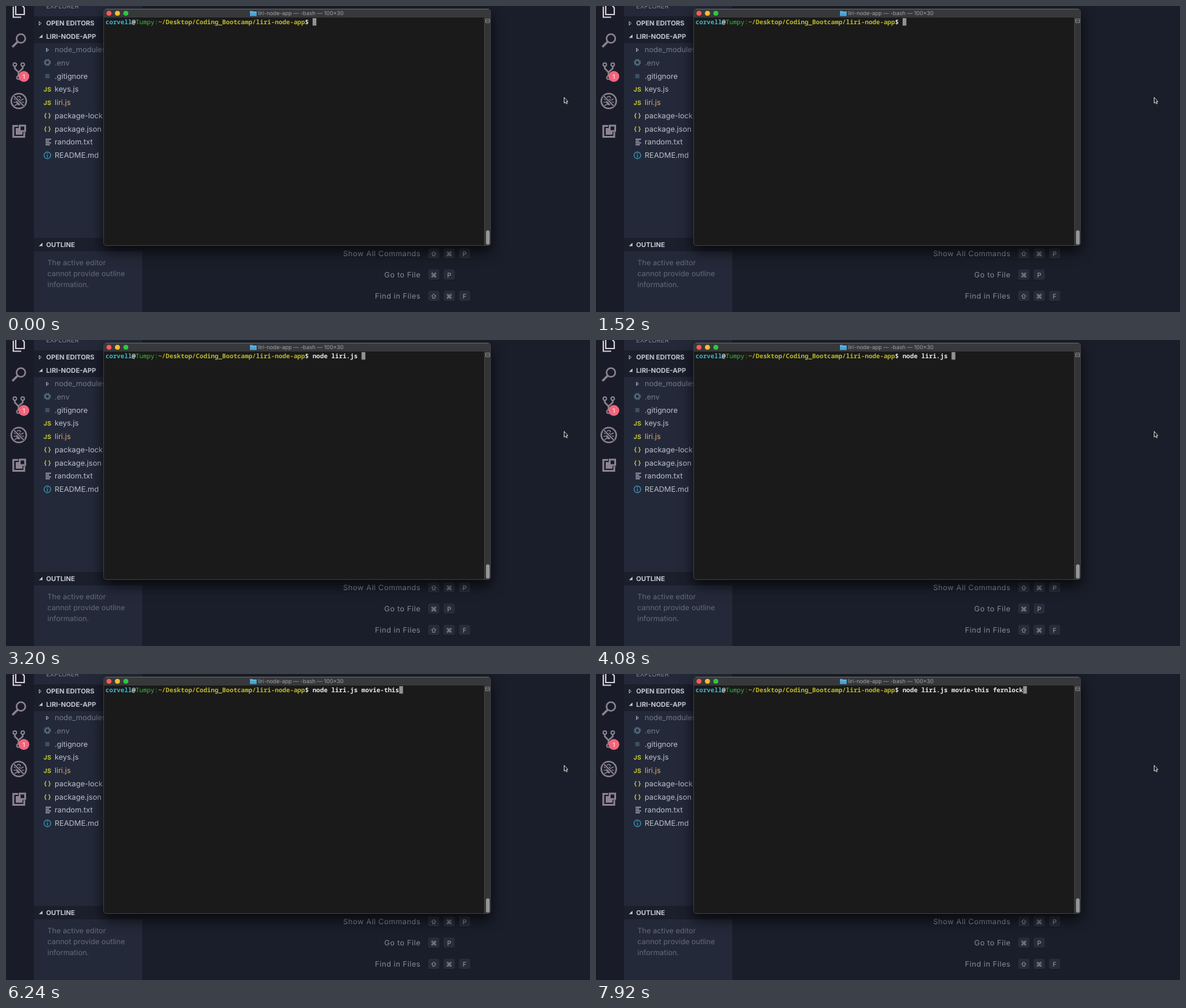
Animation, 960 px wide and 504 px high, one loop 8000 ms. Source, as an HTML page:

```html
<!DOCTYPE html>
<html lang="en">
<head>
<meta charset="utf-8">
<title>Terminal session</title>
<style>
  html, body { margin: 0; height: 100%; overflow: hidden; background: #1a1e2a; }
  svg { display: block; width: 960px; height: 504px; }
  text { font: 12.2px Inter, "Open Sans", sans-serif; text-rendering: geometricPrecision; white-space: pre; }
  .head { font-size: 10.8px; font-weight: 700; fill: #c3c7d1; }
  .note { font-size: 12.1px; fill: #656a7b; }
  .hint { letter-spacing: .5px; text-anchor: end; fill: #878b97; }
  .key { font: 10.5px Inter, "DejaVu Sans", sans-serif; text-anchor: middle; fill: #a0a4b0; }
  .mark { font-size: 10px; font-weight: 700; text-anchor: middle; fill: #c3c435; }
  .term { font: 700 10.32px "Noto Sans Mono", "DejaVu Sans Mono", monospace; fill: #e9e9e9; }
  .icon { fill: none; stroke: #8c8290; stroke-width: 2.6; }
</style>
</head>
<body>
<svg viewBox="0 0 960 504">
  <rect width="960" height="504" fill="#1a1e2a"/>
  <rect width="46" height="504" fill="#191c28"/>
  <rect x="46" width="178" height="504" fill="#242939"/>
  <path d="M46 17h178v44H46zM46 382h178v22H46z" fill="#1b1f2c"/>

  <!-- activity bar -->
  <g class="icon">
    <path d="M16 2V-3H25L30 3V14H16zM12 1V18.500H25" stroke="#d5ccd7" stroke-width="2.200"/>
    <circle cx="24.500" cy="53.500" r="7.200"/>
    <path d="M19 59L10.500 67.500" stroke-width="3.600"/>
    <circle cx="14.500" cy="96.500" r="2.800" stroke-width="2"/>
    <circle cx="27.500" cy="96.500" r="2.800" stroke-width="2"/>
    <circle cx="20.500" cy="118" r="2.800" stroke-width="2"/>
    <path d="M14.500 99V103L20.500 109V115M27.500 99V103L20.500 109"/>
    <circle cx="21" cy="156.500" r="12.300"/>
    <ellipse cx="21" cy="158" rx="4" ry="5.500" fill="#8c8290" stroke="none"/>
    <path d="M18 152a3 3 0 0 1 6 0M13 153l4 2M29 153l-4 2M12.500 158.500h17M14 164l4-2M28 164l-4-2" stroke-width="1.600"/>
    <path d="M12.500 148L29.500 165" stroke="#191c28" stroke-width="4.500"/>
    <path d="M12.500 148L29.500 165" stroke-width="2"/>
    <path d="M20 197.500H12V215.500H30V208M22.500 197H31.500V206H22.500z" stroke-width="3"/>
    <path d="M16 201h5v6h6v5H16z" fill="#8c8290" stroke="none"/>
  </g>
  <circle cx="29.300" cy="116" r="9" fill="#f2657c"/>
  <text x="29.300" y="119.500" text-anchor="middle" fill="#fff" style="font-size:10px">1</text>

  <!-- side bar -->
  <text x="66" y="4" fill="#858a99" style="font-size:10.5px">EXPLORER</text>
  <text class="head" x="66" y="32">OPEN EDITORS</text>
  <text class="head" x="66" y="54">LIRI-NODE-APP</text>
  <text class="head" x="66" y="397">OUTLINE</text>
  <path d="M54.500 25.500L58 28.500L54.500 31.500zM66.500 69.500L70 72.300L66.500 75z" fill="none" stroke="#b8bcc7"/>
  <path d="M60 47V52.500H54zM60 390V395.500H54z" fill="#c3c7d1"/>
  <g id="files"></g>
  <g fill="none" stroke-width="1.300">
    <circle cx="68" cy="93" r="3.600" stroke="#516b7b" stroke-width="2.400"/>
    <circle cx="68" cy="93" r="5.200" stroke="#516b7b" stroke-width="1.600" stroke-dasharray="2 2.084"/>
    <path d="M65 219.500h9M65 222.500h6M65 225.500h9M65 228.500h7" stroke="#b2b7c4"/>
    <circle cx="68" cy="246" r="5.500" stroke="#3b9cb5"/>
    <path d="M68 242.500v1.500M68 245v4.500" stroke="#3b9cb5"/>
  </g>
  <rect x="64.500" y="112" width="7" height="7" fill="#3c5060"/>
  <text class="note" x="68" y="427">The active editor</text>
  <text class="note" x="68" y="445">cannot provide outline</text>
  <text class="note" x="68" y="463">information.</text>
  <g id="hints"></g>

  <!-- terminal window -->
  <rect x="160" y="4" width="637" height="391" rx="5" fill="#111" style="filter:drop-shadow(0 9px 11px #000b)"/>
  <path d="M161 19V9a4 4 0 0 1 4-4H792a4 4 0 0 1 4 4V19z" fill="#37383b"/>
  <path d="M164 5.500H793" stroke="#58595b"/>
  <path d="M161 19H796V391a3 3 0 0 1-3 3H164a3 3 0 0 1-3-3z" fill="#1a1a1a"/>
  <path d="M786 19H796V394H786z" fill="#333435"/>
  <path d="M786.500 19V394" stroke="#454647"/>
  <rect x="160.500" y="4.500" width="636" height="390" rx="4.500" fill="none" stroke="#55565a" stroke-opacity=".7"/>
  <rect x="789" y="369.500" width="6" height="23.500" rx="3" fill="#949596"/>
  <path d="M788.500 21.500h6.500v6h-6.500zM788.500 24.500h6.500" fill="none" stroke="#8d8e8f"/>
  <circle cx="169.300" cy="12" r="4.100" fill="#fb5b56"/>
  <circle cx="183.200" cy="12" r="4.100" fill="#fcbb2f"/>
  <circle cx="197" cy="12" r="4.100" fill="#2bc840"/>
  <path d="M401 8h4l1 1h6v7.500H401z" fill="#47a5d8"/>
  <path d="M401 10.500h11" stroke="#7cc6ea" stroke-width=".8"/>
  <text x="414" y="15.300" fill="#a2a3a5" style="font-size:9px">liri-node-app — -bash — 100×30</text>
  <rect id="caret" y="20" width="6.200" height="12.300" fill="#929292"/>
  <text class="term" x="163.500" y="30.300"><tspan fill="#3fb4cb">corvell</tspan>@<tspan fill="#35bd3c" font-weight="400" style="font-weight:500">Tumpy:</tspan><tspan fill="#bcb82c">~/Desktop/Coding_Bootcamp/liri-node-app</tspan>$ <tspan id="typed"></tspan></text>

  <!-- mouse pointer -->
  <path d="M917.500 150.500V160L919.700 158L921.200 161.300L922.700 160.600L921.200 157.400H923.700z" fill="#0b0b0d" stroke="#e4e4e6"/>
</svg>
<script>
const $ = id => document.getElementById(id);

const rows = [
  ["node_modules", "#747a8b"], [".env", "#747a8b"], [".gitignore"],
  ["keys.js", , "JS"], ["liri.js", "#d6ab74", "JS"],
  ["package-lock.json", , "{ }"], ["package.json", , "{ }"],
  ["random.txt"], ["README.md"]
];
$("files").innerHTML = rows.map(([name, color = "#bcc0cb", mark = ""], i) => {
  const y = 76 + 21.75 * i;
  return `<text x="80" y="${y}" fill="${color}">${name}</text>
    <text class="mark" x="68" y="${y - .5}">${mark}</text>`;
}).join("");

const hints = [["Show All Commands", "⇧⌘P"], ["Go to File", "⌘P"], ["Find in Files", "⇧⌘F"]];
$("hints").innerHTML = hints.map(([label, keys], i) => {
  const y = 412 + 35 * i;
  const caps = [...keys].map((key, k) => {
    const x = 694 + 25.3 * k;
    return `<rect x="${x}" y="${y - 13}" width="18.500" height="18" rx="3" fill="#14171f"/>
      <rect x="${x}" y="${y - 13}" width="18.500" height="17" rx="3" fill="#282c39"/>
      <text class="key" x="${x + 9.2}" y="${y - .3}">${key}</text>`;
  });
  return `<text class="hint" x="681.500" y="${y}">${label}</text>` + caps.join("");
}).join("");

// One key press time in ms per character of the command.
const command = "node liri.js movie-this fernlock";
const presses = [
  1680, 1760, 1920, 2000, 2080, 2240, 2320, 2480, 2560, 2640, 2880, 3040, 3200,
  4640, 4800, 4960, 5040, 5200, 5600, 5760, 5920, 6000, 6160,
  6400, 6560, 6720, 6880, 7040, 7120, 7280, 7440, 7600
];
const start = performance.now();

function draw() {
  const t = (performance.now() - start) % 8000;
  const count = presses.filter(p => p <= t).length;
  $("typed").textContent = command.slice(0, count);
  $("caret").setAttribute("x", 504 + 6.192 * count);
  requestAnimationFrame(draw);
}
draw();
</script>
</body>
</html>
```
